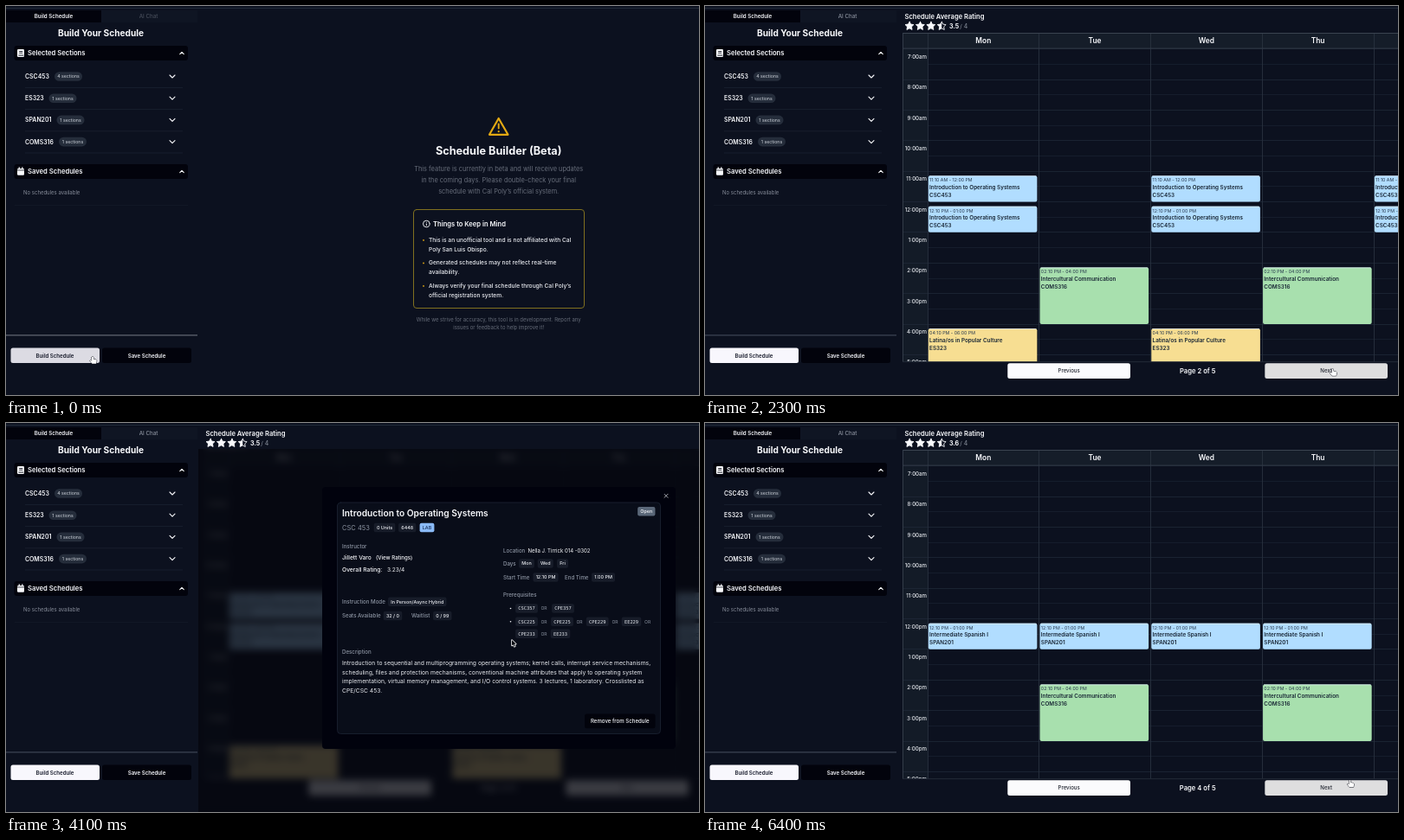
An HTML page with a canvas for the animation above (6500 ms loop, 800 by 450 pixels).

```html
<!DOCTYPE html>
<html lang="en">
<head>
<meta charset="utf-8">
<title>Schedule builder</title>
<style>
  html, body { margin: 0; width: 100%; height: 100%; overflow: hidden; background: #0c111f; }
  canvas { display: block; width: 800px; height: 450px; }
</style>
</head>
<body>
<canvas id="stage" width="800" height="450"></canvas>
<script>
const canvas = document.getElementById('stage');
const ctx = canvas.getContext('2d');
const LOOP = 6500, STEP = 100;
const SANS = 'Inter, sans-serif', MONO = '"DejaVu Sans Mono", monospace';
const BG = '#0c111f', INK = '#02030c', WHITE = '#f8f9fc', GREY = '#666c79', LABEL = '#8d95a3';

// Text is placed by the middle of its capitals.
function text(s, x, y, size, color = WHITE, weight = 400, align = 'left', family = SANS) {
  ctx.font = `${weight} ${size}px ${family}`;
  ctx.textAlign = align;
  ctx.fillStyle = color;
  ctx.fillText(s, x, y + size * 0.364);
}

function box(x, y, w, h, r, fill, stroke, line = 1) {
  ctx.beginPath();
  ctx.roundRect(x, y, w, h, r);
  if (fill) { ctx.fillStyle = fill; ctx.fill(); }
  if (stroke) { ctx.strokeStyle = stroke; ctx.lineWidth = line; ctx.stroke(); }
}

function poly(points, color, width = 1, close = false) {
  ctx.beginPath();
  points.forEach(([x, y]) => ctx.lineTo(x, y));
  if (close) ctx.closePath();
  ctx.strokeStyle = color;
  ctx.lineWidth = width;
  ctx.lineCap = ctx.lineJoin = 'round';
  ctx.stroke();
}

function rect(x, y, w, h, color) {
  ctx.fillStyle = color;
  ctx.fillRect(x, y, w, h);
}

function dot(x, y, r, color) {
  ctx.beginPath();
  ctx.arc(x, y, r, 0, Math.PI * 2);
  ctx.fillStyle = color;
  ctx.fill();
}

function button(s, x, y, w, h, fill, color) {
  box(x, y, w, h, 2.5, fill);
  text(s, x + w / 2, y + h / 2, 6.1, color, 500, 'center');
}

function chevron(x, y, w, dir) {
  poly([[x - w / 2, y - dir * w / 4], [x, y + dir * w / 4], [x + w / 2, y - dir * w / 4]], WHITE, 1.1);
}

function cross(x, y, r) {
  poly([[x - r, y - r], [x + r, y + r]], '#c9ccd3', 0.8);
  poly([[x + r, y - r], [x - r, y + r]], '#c9ccd3', 0.8);
}

// ---- sidebar ----
function sectionBar(title, y) {
  box(9.5, y - 8.5, 200.5, 17, 3, INK);
  text(title, 25, y, 7.65, WHITE, 600);
  chevron(203, y, 4.5, -1);
}

function sidebar(t, built) {
  rect(0, 2, 800, 1, '#222b39');
  rect(0, 5, 110, 14, INK);
  rect(110, 5, 111, 14, '#0f1523');
  text('Build Schedule', 55, 12, 6.2, WHITE, 600, 'center');
  text('AI Chat', 164.5, 12, 6.2, built ? '#8a909d' : '#474d5a', 500, 'center');
  text('Build Your Schedule', 109.5, 31.5, 10.15, WHITE, 700, 'center');

  sectionBar('Selected Sections', 54.5);
  box(13, 50, 8, 9, 1.3, WHITE);
  rect(15.2, 52, 4, 0.8, INK);
  rect(15.2, 53.8, 4, 0.8, INK);
  rect(14.4, 56.6, 6, 0.9, INK);

  [['CSC453', 4, 56], ['ES323', 1, 49.5], ['SPAN201', 1, 58.5], ['COMS316', 1, 61]].forEach(([code, n, x], i) => {
    const y = 81.5 + i * 25.2;
    text(code, 22, y, 6.9, WHITE, 600);
    box(x, y - 5.3, 32, 10.6, 5.3, '#252d3b');
    text(`${n} sections`, x + 16, y, 5.25, '#cfd4dc', 400, 'center');
    chevron(192, y, 6, 1);
    rect(22, y + 12.5, 182, 0.8, '#192130');
  });

  sectionBar('Saved Schedules', 191.5);
  box(13, 188, 8, 7.8, 1.2, WHITE);
  rect(14.6, 186.4, 1.3, 2.4, WHITE);
  rect(18.2, 186.4, 1.3, 2.4, WHITE);
  rect(13, 189.6, 8, 0.7, INK);
  text('No schedules available', 20, 215.5, 6, '#858b98');
  rect(10, 230, 200, 0.7, '#141b29');

  rect(0, 380.4, 221, 1, built ? '#485060' : '#757b86');
  button('', 5.5, 395.5, 102.5, 17.5, t < 700 ? '#dcdbe3' : '#f8f7fd');
  text('Build Schedule', 56.5, 404.5, 6.1, '#161a29', 600, 'center');
  box(111, 395.5, 103, 17.5, 2.5, INK);
  text('Save Schedule', 162.5, 404.5, 6.1, WHITE, 600, 'center');
}

// ---- notice before any schedule exists ----
function notice() {
  const amber = '#e3a913', cx = 568.7;
  poly([[cx, 130], [579.5, 148.8], [558, 148.8]], amber, 2.2, true);
  poly([[cx, 136.5], [cx, 141.5]], amber, 1.9);
  dot(cx, 145.2, 1.1, amber);
  text('Schedule Builder (Beta)', cx, 167, 12.7, WHITE, 700, 'center');
  ['This feature is currently in beta and will receive updates',
   'in the coming days. Please double-check your final',
   'schedule with Cal Poly’s official system.'].forEach((s, i) =>
    text(s, cx, 188.3 + i * 12.9, 7.4, GREY, 400, 'center'));

  box(470.5, 235.5, 197, 114, 3.5, null, '#80701f', 1);
  ctx.beginPath();
  ctx.arc(485.3, 252, 3.8, 0, Math.PI * 2);
  ctx.strokeStyle = WHITE;
  ctx.lineWidth = 0.9;
  ctx.stroke();
  rect(484.9, 251.6, 0.9, 2.6, WHITE);
  rect(484.9, 249.8, 0.9, 0.9, WHITE);
  text('Things to Keep in Mind', 493, 252, 7.6, WHITE, 600);
  [['This is an unofficial tool and is not affiliated with Cal', 'Poly San Luis Obispo.'],
   ['Generated schedules may not reflect real-time', 'availability.'],
   ['Always verify your final schedule through Cal Poly’s', 'official registration system.']].forEach((lines, i) => {
    const y = 270.5 + i * 26.5;
    dot(482, y + 0.4, 0.9, amber);
    lines.forEach((s, j) => text(s, 488, y + j * 10.6, 6.65, '#eceef3', 500));
  });
  text('While we strive for accuracy, this tool is in development. Report any', cx, 363, 5.95, GREY, 400, 'center');
  text('issues or feedback to help improve it!', cx, 371.8, 5.95, GREY, 400, 'center');
}

// ---- calendar ----
const HOUR = 35.36, TOP = 49.3, COL = 128.75;
const hourY = h => TOP + (h - 7) * HOUR;
const colX = d => 257.8 + d * COL;
const BLUE = '#b1ddff', GREEN = '#a8e0ae', YELLOW = '#f7de92';

// days, start, end, time label, title, code, colour
const OS = (days, a, b, label) => [days, a, b, label, 'Introduction to Operating Systems', 'CSC453', BLUE];
const SPANISH = [[0, 1, 2, 3, 4], 12 + 1 / 6, 13, '12:10 PM - 01:00 PM', 'Intermediate Spanish I', 'SPAN201', BLUE];
const COMMS = [[1, 3], 14 + 1 / 6, 16, '02:10 PM - 04:00 PM', 'Intercultural Communication', 'COMS316', GREEN];
const CULTURE = [[0, 2], 16 + 1 / 6, 18, '04:10 PM - 06:00 PM', 'Latina/os in Popular Culture', 'ES323', YELLOW];
const SPANISH_4 = [[0, 1, 2, 3], ...SPANISH.slice(1)];

const PAGES = [
  { rating: '3.7', stars: 4, events: [
    OS([1, 3], 8 + 1 / 6, 9.5, '08:10 AM - 09:30 AM'),
    OS([1, 3], 9 + 2 / 3, 11, '09:40 AM - 11:00 AM'), SPANISH_4, COMMS, CULTURE] },
  { rating: '3.5', stars: 3.5, events: [
    OS([0, 2, 4], 11 + 1 / 6, 12, '11:10 AM - 12:00 PM'),
    OS([0, 2, 4], 12 + 1 / 6, 13, '12:10 PM - 01:00 PM'), COMMS, CULTURE] },
  { rating: '3.6', stars: 3.5, events: [SPANISH_4, COMMS, CULTURE] },
  { rating: '3.6', stars: 3.5, events: [SPANISH_4, COMMS] }
];

function star(x, y, fill) {
  const path = new Path2D();
  for (let i = 0; i < 10; i++) {
    const a = -Math.PI / 2 + i * Math.PI / 5, r = i % 2 ? 2.6 : 5.2;
    path.lineTo(x + r * Math.cos(a), y + r * Math.sin(a));
  }
  path.closePath();
  ctx.strokeStyle = ctx.fillStyle = WHITE;
  ctx.lineWidth = 0.9;
  ctx.lineJoin = 'round';
  ctx.stroke(path);
  ctx.save();
  ctx.beginPath();
  ctx.rect(x - 6, y - 6, 12 * fill, 12);
  ctx.clip();
  ctx.fill(path);
  ctx.restore();
}

function event([days, start, end, label, title, code, fill]) {
  const y = hourY(start) - 0.2, h = (end - start) * HOUR + 0.6;
  for (const d of days) {
    const x = colX(d);
    box(x, y, 125.6, h, 2, fill);
    rect(x + 1, y, 123.6, 0.7, '#e3effa');
    text(label, x + 1.3, y + 4.9, 5.25, '#26384c');
    text(title, x + 1.3, y + 13.1, 6.3, '#182634', 600);
    text(code, x + 1.3, y + 22, 6.3, '#182634', 600);
  }
}

function calendar(page, hover) {
  const { rating, stars, events } = PAGES[page];
  text('Schedule Average Rating', 230.5, 12, 7.6, WHITE, 600);
  for (let i = 0; i < 4; i++) star(236 + i * 12.4, 23.2, Math.min(1, stars - i));
  text(rating, 282, 23.3, 7.1, WHITE, 700);
  text('/ 4', 294.3, 23.3, 7, '#8d94a1');

  ctx.save();
  ctx.beginPath();
  ctx.rect(228, 31, 572, 380.5);
  ctx.clip();
  rect(228, 31, 572, 18, '#151d29');
  rect(228, 49, 29, 363, '#131b27');
  for (let i = 0; i < 22; i++) {
    const y = Math.round(TOP + i * HOUR / 2);
    rect(i % 2 ? 257 : 228, y, 572, 0.8, i % 2 ? '#182130' : '#1f2937');
  }
  for (let d = 0; d < 5; d++) rect(Math.round(colX(d) - 1.2), 31, 0.9, 381, '#29323f');
  rect(228, 31, 572, 1, '#3a4350');
  rect(228, 48.6, 572, 0.9, '#333c49');
  rect(228, 31, 1, 381, '#333c49');
  ['Mon', 'Tue', 'Wed', 'Thu'].forEach((s, d) => text(s, colX(d) + 63.5, 39.7, 8.4, WHITE, 600, 'center'));
  for (let h = 7; h <= 17; h++)
    text(`${(h - 1) % 12 + 1}:00${h < 12 ? 'am' : 'pm'}`, 256, hourY(h) + 9.3, 6.15, '#e4e7ec', 500, 'right');
  events.forEach(event);
  ctx.restore();

  rect(228, 411.3, 572, 0.8, '#27303d');
  button('Previous', 349.3, 413.3, 141.7, 17.7, page ? '#fbfbfd' : '#7b7d84', page ? '#20242f' : '#2b2e38');
  button('Next', 646.3, 413.3, 141.7, 17.7, hover ? '#dededf' : '#fbfbfd', '#20242f');
  text(`Page ${page + 1} of 5`, 568.7, 422.3, 7.65, WHITE, 600, 'center');
}

// ---- dialog ----
function chip(s, cx, cy, fill = '#171c29', color = '#eceef3', family = SANS) {
  const size = 5.4;
  ctx.font = `500 ${size}px ${family}`;
  const w = ctx.measureText(s).width + 6.4;
  box(cx - w / 2, cy - 5.3, w, 10.6, 2, fill);
  text(s, cx, cy, size, color, family === MONO ? 400 : 500, 'center', family);
}

function chain(codes, y) {
  codes.forEach(([s, x]) => s === 'OR'
    ? text(s, x, y, 5.1, LABEL, 400, 'center')
    : chip(s, x, y, '#171c29', '#e3e6ec', MONO));
}

function loading() {
  box(540, 93, 59, 186, 3, INK);
  cross(588.5, 101.3, 1.8);
  text('Loading...', 568.5, 112.3, 6.6, '#a5a9b3', 400, 'center');
}

function details() {
  box(365, 74, 408, 303, 4, '#01020d');
  cross(762, 84.3, 2);
  box(382.5, 92, 373, 267.5, 4, '#090d19', '#1a2130', 0.9);
  text('Introduction to Operating Systems', 388, 104.5, 10.2, WHITE, 600);
  chip('Open', 739.3, 102.2, '#5a6778', WHITE);
  text('CSC 453', 388, 121, 7.5, '#8d95a3');
  chip('0 Units', 437, 121);
  chip('6448', 463.2, 121);
  chip('LAB', 486, 121, '#8abaf7', '#17305c');

  const label = (s, x, y) => text(s, x, y, 6.15, LABEL, 500);
  label('Instructor', 388, 142.3);
  text('Jillett Varo', 388, 155.8, 6.7, WHITE, 500);
  text('(View Ratings)', 427, 155.8, 6.1, WHITE, 500);
  text('Overall Rating:', 388, 170, 6.7, WHITE, 500);
  text('3.23/4', 440, 170, 6.5, WHITE);
  label('Instruction Mode', 388, 206.8);
  chip('In Person/Async Hybrid', 474.8, 206.8);
  label('Seats Available', 388, 223);
  chip('32 / 0', 446.5, 223);
  label('Waitlist', 468, 223);
  chip('0 / 99', 503.8, 223);

  label('Location', 574, 147.5);
  text('Nella J. Tirrick 014 -0302', 602.5, 147.5, 6, WHITE, 400);
  label('Days', 574, 162.5);
  chip('Mon', 601, 162.5);
  chip('Wed', 622.7, 162.5);
  chip('Fri', 642.5, 162.5);
  label('Start Time', 574, 178.5);
  chip('12:10 PM', 623, 178.5);
  label('End Time', 645, 178.5);
  chip('1:00 PM', 689.5, 178.5);

  label('Prerequisites', 574, 198.8);
  dot(582.5, 214.5, 0.8, WHITE);
  dot(582.5, 229.8, 0.8, WHITE);
  chain([['CSC357', 601], ['OR', 621], ['CPE357', 643]], 214.5);
  chain([['CSC225', 601], ['OR', 621], ['CPE225', 642], ['OR', 662], ['CPE229', 682.7],
    ['OR', 703], ['EE229', 722], ['OR', 740.7]], 229.8);
  chain([['CPE233', 601], ['OR', 621], ['EE233', 640]], 243.8);

  label('Description', 388, 264.5);
  ['Introduction to sequential and multiprogramming operating systems; kernel calls, interrupt service mechanisms,',
   'scheduling, files and protection mechanisms, conventional machine attributes that apply to operating system',
   'implementation, virtual memory management, and I/O control systems. 3 lectures, 1 laboratory. Crosslisted as',
   'CPE/CSC 453.'].forEach((s, i) => text(s, 388, 277.5 + i * 10.7, 6.75, '#e8eaef'));
  button('Remove from Schedule', 668, 336.5, 81.5, 16.7, INK, WHITE);
}

const ramp = (t, a, b) => Math.max(0, Math.min(1, (t - a) / (b - a)));

function dialog(t) {
  const p = t < 4500 ? ramp(t, 3700, 3900) : 1 - ramp(t, 5100, 5300);
  if (!p) return;
  ctx.save();
  ctx.beginPath();
  ctx.rect(222, 30, 578, 420);
  ctx.clip();
  ctx.globalAlpha = p;
  ctx.filter = 'blur(4.2px)';
  ctx.drawImage(canvas, 0, 0);
  ctx.filter = 'none';
  ctx.globalAlpha = p * 0.78;
  rect(222, 30, 578, 420, '#04060d');
  ctx.restore();

  ctx.save();
  ctx.globalAlpha = p;
  if (t < 4100) loading();
  else {
    const k = 0.95 + 0.05 * p;
    ctx.translate(569, 225.5);
    ctx.scale(k, k);
    ctx.translate(-569, -225.5);
    details();
  }
  ctx.restore();
}

// ---- pointer ----
const PATH = [[0, 100, 406], [600, 100, 406], [1200, 116, 264], [1400, 118, 266], [2000, 722, 420],
  [2800, 730, 420], [3000, 748, 394], [3500, 584, 251], [4300, 584, 251], [4800, 815, 90],
  [5000, 815, 90], [5500, 756, 417], [5900, 754, 417], [6400, 744.5, 413.5], [6500, 744, 413]];

function pointerAt(t) {
  const i = Math.max(1, PATH.findIndex(k => k[0] > t));
  const [t0, x0, y0] = PATH[i - 1], [t1, x1, y1] = PATH[i];
  const u = ramp(t, t0, t1), e = u * u * (3 - 2 * u);
  return [x0 + (x1 - x0) * e, y0 + (y1 - y0) * e];
}

const ARROW = new Path2D('M0 0V6.6L1.6 5.2L2.7 7.7L3.8 7.2L2.7 4.8H4.8Z');
const HAND = new Path2D('M-.9 0Q0-1 .9 0V2.4L3.9 3.1Q4.8 3.4 4.7 4.6L4.1 7.8H-.6L-3 4.8Q-3.4 3.6-2.2 3.8L-.9 4.8Z');

function pointer(t) {
  const hand = t < 700 || (t >= 1900 && t < 2900) || t >= 5400;
  const [x, y] = pointerAt(t);
  ctx.save();
  ctx.translate(x, y);
  ctx.lineJoin = 'round';
  ctx.lineWidth = hand ? 0.9 : 1.5;
  ctx.strokeStyle = hand ? '#11141d' : '#fff';
  ctx.fillStyle = hand ? '#fff' : '#080a10';
  const shape = hand ? HAND : ARROW;
  ctx.stroke(shape);
  ctx.fill(shape);
  ctx.restore();
}

function draw(t) {
  const built = t >= 400;
  const page = t < 2300 ? 0 : t < 5800 ? 1 : t < 6200 ? 2 : 3;
  const hover = (t >= 1900 && t <= 3000) || t >= 5400;
  rect(0, 0, 800, 450, BG);
  sidebar(t, built);
  if (built) calendar(page, hover);
  else notice();
  dialog(t);
  pointer(t);
}

const begin = performance.now();
function tick() {
  const t = (performance.now() - begin) % LOOP;
  draw(Math.floor(t / STEP) * STEP);
  requestAnimationFrame(tick);
}
tick();
</script>
</body>
</html>
```
